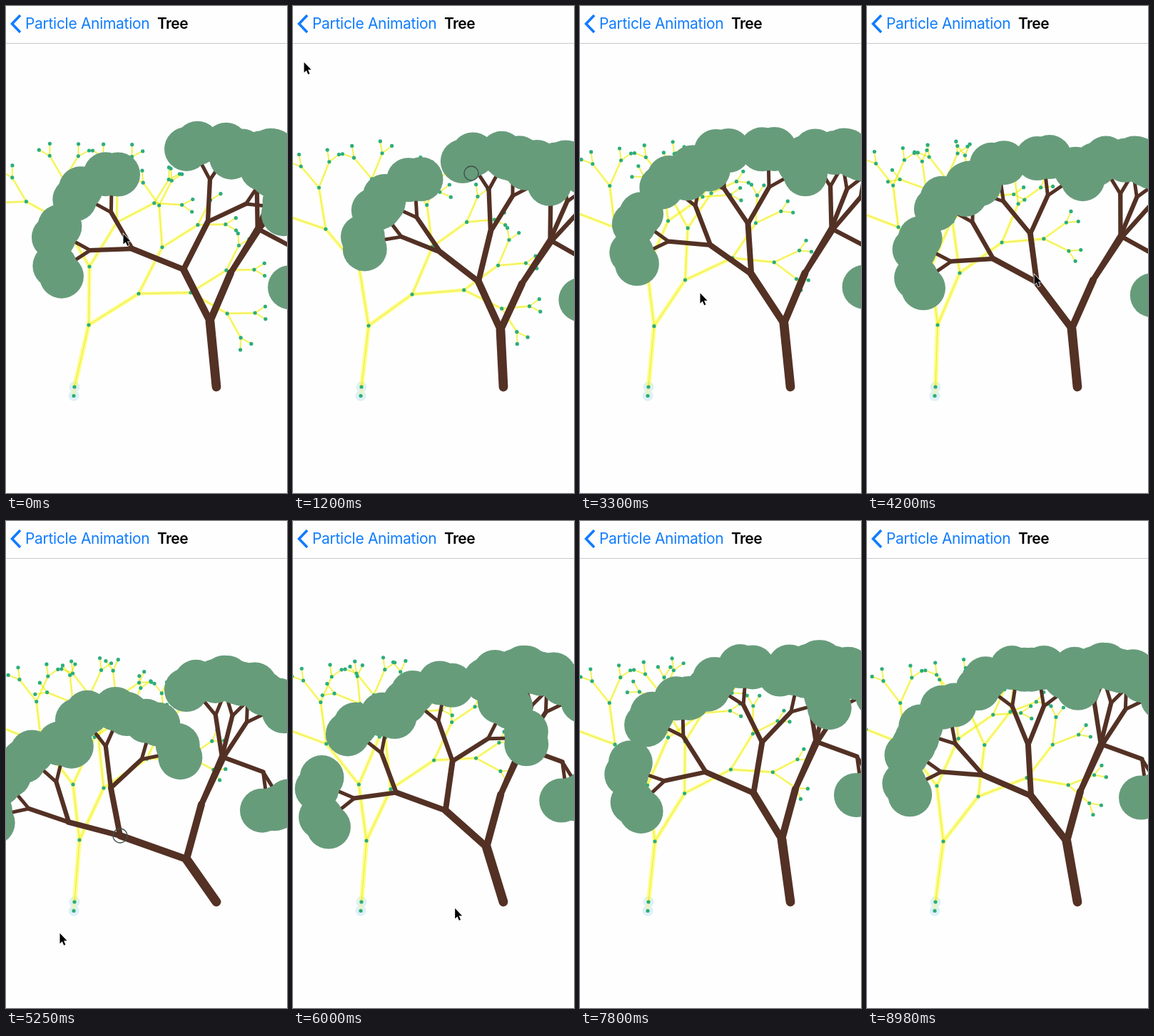
Write an HTML page with a canvas that moves like this. It is 394 px wide and 684 px high and loops after 9.04 s.

```html
<!DOCTYPE html>
<html lang="en">
<head>
<meta charset="utf-8">
<title>Tree</title>
<style>
  html, body { margin: 0; width: 100%; height: 100%; overflow: hidden; background: #fefefe; }
  canvas { position: absolute; left: 0; top: 0; }
  header {
    position: absolute; left: 0; top: 0; width: 394px; height: 52px;
    background: #fefefe; border-bottom: 1px solid #c9c9cb;
    font: 21px/50px Inter, "Open Sans", sans-serif; letter-spacing: -.3px; white-space: nowrap;
  }
  header svg { position: absolute; left: 0; top: 0; }
  header span, header b { position: absolute; top: 0; }
  header span { left: 27px; color: #107cfe; }
  header b { left: 212px; color: #000; font-weight: 600; letter-spacing: -.6px; }
</style>
</head>
<body>
<canvas id="stage" width="394" height="684"></canvas>
<header>
  <svg width="28" height="52"><path d="M20 13 L8.5 25 L20 37" fill="none" stroke="#107cfe" stroke-width="3.6"/></svg>
  <span>Particle Animation</span><b>Tree</b>
</header>
<script>
const LOOP = 9040, STEP = 150, LAST = 8980;
const ctx = document.getElementById('stage').getContext('2d');
const RAD = Math.PI / 180, FORK = 31;

// Limb lengths by level; the trees are binary, in heap order, with node 0 as the root.
const LENGTHS = [87, 82, 73, 59, 39, 17];
const NODES = 2 ** LENGTHS.length;

// Guide joints (x, y in heap order) hold the big limbs; the rest grows from them by forking.
// open and lean set how the wood's middle forks spread and tilt, in degrees.
const poses = [
  { time: 0, open: 31, lean: 7, wire: [116,448, 117,366, 186,404],
    wood: [286,443, 249,370, 315,375, 177,341, 283,303] },
  { time: 1200, open: 17, lean: 1, wire: [106,449, 93,369, 167,405],
    wood: [291,455, 260,387, 321,390, 207,346, 277,317] },
  { time: 2550, open: 32, lean: 3, wire: [108,451, 98,369, 162,393],
    wood: [285,440, 242,367, 314,367, 188,320, 241,294] },
  { time: 4200, open: 32, lean: 0, wire: [99,448, 89,368, 130,375],
    wood: [287,453, 238,388, 317,385, 177,355, 229,320] },
  { time: 5250, open: 27, lean: 31, wire: [103,448, 94,370, 137,375],
    wood: [253,475, 160,442, 274,398, 88,423, 147,375] },
  { time: 6600, open: 48, lean: -5, wire: [103,450, 91,370, 137,378],
    wood: [286,444, 257,378, 305,373, 190,348, 285,307] },
  { time: LAST, open: 22, lean: 3, wire: [107,450, 98,372, 156,387],
    wood: [280,450, 230,386, 299,380, 163,357, 226,315] }
];

// The wood's right side droops: turns that replace the even fork at these nodes.
const DROOP = { 6: 8, 7: 10, 12: -32, 13: -9, 14: 8, 15: 85, 30: 62, 31: 38 };

const pointer = [
  { time: 0, at: [164, 320] }, { time: 1200, at: [15, 79] }, { time: 2550, at: [113, 425] },
  { time: 4200, at: [234, 377] }, { time: 5250, at: [75, 579] }, { time: 6600, at: [348, 516] },
  { time: 7050, at: [372, 690] }
];
const touches = [{ time: 1200, at: [250, 235] }, { time: 5250, at: [160, 442] }];

const mix = (a, b, p) => a + (b - a) * p;
const mixAll = (a, b, p) => a.map((v, i) => mix(v, b[i], p));
const level = i => Math.floor(Math.log2(i));

function span(list, t) {
  let i = 0;
  while (i < list.length - 2 && t >= list[i + 1].time) i++;
  const a = list[i], b = list[i + 1];
  return [a, b, (t - a.time) / (b.time - a.time)];
}

function grow(root, guides, open, lean, bends = {}) {
  const at = [root], heading = [];
  for (let i = 1; i < NODES; i++) {
    const [x, y] = at[i >> 1];
    if (2 * i <= guides.length) {
      at[i] = guides.slice(2 * i - 2, 2 * i);
      heading[i] = Math.atan2(at[i][1] - y, at[i][0] - x);
      continue;
    }
    const middle = level(i) === 3, side = i % 2 ? 1 : -1;
    const turn = bends[i] ?? (middle ? lean + side * open : side * FORK);
    const length = LENGTHS[level(i)];
    heading[i] = heading[i >> 1] + turn * RAD;
    at[i] = [x + length * Math.cos(heading[i]), y + length * Math.sin(heading[i])];
  }
  return at;
}

function line(a, b, width, color) {
  ctx.lineWidth = width;
  ctx.strokeStyle = color;
  ctx.beginPath();
  ctx.moveTo(...a);
  ctx.lineTo(...b);
  ctx.stroke();
}

function disc([x, y], r, color) {
  ctx.fillStyle = color;
  ctx.beginPath();
  ctx.arc(x, y, r, 0, 2 * Math.PI);
  ctx.fill();
}

function drawWire(at) {
  const foot = [95, 547.5];
  ctx.lineCap = 'butt';
  for (const p of [at[0], foot]) disc(p, 7.5, '#dff0f8');
  line(foot, at[0], 5, 'rgba(255,255,60,.3)');
  for (let i = 1; i < NODES; i++) line(at[i >> 1], at[i], 6.2 - .75 * level(i), 'rgba(255,255,20,.53)');
  for (let i = 1; i < NODES; i++) line(at[i >> 1], at[i], .8, 'rgba(205,200,30,.6)');
  for (const p of [...at, foot]) disc(p, 2.6, '#2bae7c');
}

function drawWood(at) {
  const leaves = NODES / 2;
  ctx.lineCap = 'round';
  for (let i = 1; i < leaves; i++) line(at[i >> 1], at[i], 12.8 * .79 ** level(i), '#533124');
  for (let i = leaves; i < NODES; i++) disc(at[i], 31, '#679c7b');
}

function drawPointer(t) {
  for (const { time, at } of touches) {
    if (Math.abs(t - time) > STEP) continue;
    ctx.strokeStyle = '#41504a';
    ctx.lineWidth = 1.3;
    ctx.beginPath();
    ctx.arc(...at, 10, 0, 2 * Math.PI);
    ctx.stroke();
  }
  if (t > pointer.at(-1).time) return;
  const [a, b, p] = span(pointer, t);
  const arrow = new Path2D('M.5 0V14.5L3.8 11.4L6.2 17L8.4 16L6 10.6H10.5Z');
  ctx.save();
  ctx.translate(...mixAll(a.at, b.at, p));
  ctx.lineWidth = 1.4;
  ctx.strokeStyle = '#fff';
  ctx.stroke(arrow);
  ctx.fillStyle = '#000';
  ctx.fill(arrow);
  ctx.restore();
}

function draw(t) {
  const [a, b, p] = span(poses, t);
  ctx.clearRect(0, 0, 394, 684);
  drawWire(grow([96, 535], mixAll(a.wire, b.wire, p), FORK, 0));
  drawWood(grow([295, 535], mixAll(a.wood, b.wood, p), mix(a.open, b.open, p), mix(a.lean, b.lean, p), DROOP));
  drawPointer(t);
}

const start = performance.now();
function tick() {
  const t = (performance.now() - start) % LOOP;
  draw(t >= LAST ? LAST : Math.floor(t / STEP) * STEP);
  requestAnimationFrame(tick);
}
tick();
</script>
</body>
</html>
```
